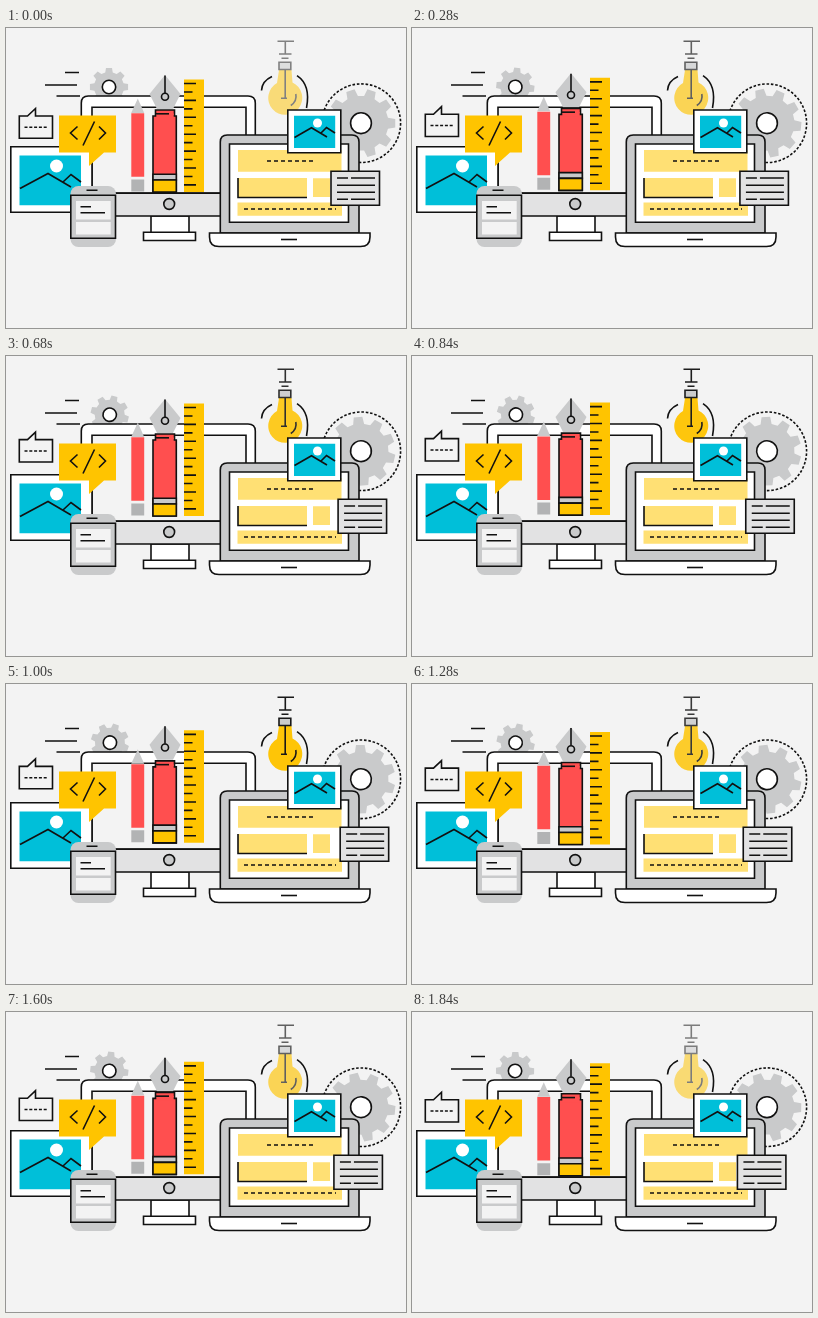
An HTML page that plays this animation: 400 by 300 pixels, repeating every 1880 ms.

```html
<!DOCTYPE html>
<html lang="en">
<head>
<meta charset="utf-8">
<title>Design workspace</title>
<style>
html, body { margin: 0; width: 100%; height: 100%; overflow: hidden; background: #f3f3f3; }
svg { display: block; width: 100%; height: 100%; }
.k { stroke: #111; stroke-width: 1.6; }
.n { fill: none; }
.w { fill: #fff; }
.b { fill: #f3f3f3; }
.g { fill: #c9cacb; }
.y { fill: #ffc400; }
.l { fill: #ffe074; }
.c { fill: #00bfd9; }
.r { fill: #ff4f4f; }
</style>
</head>
<body>
<svg viewBox="0 0 400 300">
  <path class="k n" d="M59 44.5h14M39 57h32M50.5 68h23.5"/>

  <g id="smallGear">
    <path class="g" id="smallTeeth"/>
    <circle class="k w" cx="103" cy="59" r="6.7"/>
  </g>
  <g id="bigGear">
    <circle class="k n" cx="355.3" cy="95.2" r="39.3" stroke-dasharray="2.6 1.8"/>
    <path class="g" id="bigTeeth"/>
    <circle class="k w" cx="355" cy="95.2" r="10.4"/>
  </g>

  <!-- monitor -->
  <path class="k w" d="M75.3 165V75q0-7 7-7H242q7.300 0 7.300 7V165z"/>
  <path class="k b" d="M86 165V79.200H240V165z"/>
  <path class="k w" d="M145 188h38v16.300h-38zM137.500 204.300h52v8.200h-52z"/>
  <path class="k" fill="#e2e2e3" d="M80 165.300H230V188H80z"/>
  <circle class="k g" cx="163.200" cy="176" r="5.400"/>

  <!-- left picture -->
  <path class="k w" d="M4.800 118.800H86V184.300H4.800z"/>
  <path class="c" d="M13.500 127.500H75V177.300H13.500z"/>
  <circle class="w" cx="50.500" cy="138" r="6.500"/>
  <path class="k n" d="M14 160.500L42 145.500L65 159M57 154L65 146.500L75 154"/>

  <path class="y" d="M53 87.500h57v37H98L83 138V124.500H53z"/>
  <path class="k n" d="M71.500 98.500L64.500 105L71.500 111.500M88.500 93.500L77 117.500M93 98.500L99.500 105L93 111.500"/>

  <!-- phone -->
  <rect class="g" x="64.500" y="158" width="45.500" height="61" rx="8"/>
  <path class="k g" d="M64.800 167.300h44.700v43H64.800z"/>
  <path class="b" d="M70 173h34.700v18.500H70zM70 194h34.700v12.500H70z"/>
  <path class="k n" d="M80.500 162.300h11M74.500 178.800h10.500M74.500 184.800h24.500"/>

  <!-- drawing tools -->
  <g id="tools">
    <path class="g" d="M131.800 70.500L138.200 85h-13z"/>
    <path class="r" d="M125.300 85.300h12.900v63.500h-12.900z"/>
    <path fill="#b2b3b4" d="M125.300 151.500h12.900v12h-12.900z"/>
    <path class="g" d="M159 47L174.500 66L167 81H151L143.500 66z"/>
    <path class="k n" d="M159 47.500V65"/>
    <circle class="k g" cx="159" cy="68.700" r="3.500"/>
    <path class="k r" d="M149.500 88V82h19v6z"/>
    <path class="k r" d="M147 88h23.300v76H147z"/>
    <path class="r" d="M150.300 85.500h17.400v5h-17.400z"/>
    <path class="k n" d="M150 85.800h13"/>
    <path class="k g" d="M147 146.300h23.300v5.700H147z"/>
    <path class="k y" d="M147 152h23.300v12H147z"/>
    <path class="y" d="M178 51.500h20v112.500h-20z"/>
    <path class="k n" id="ticks"/>
  </g>

  <!-- lamp -->
  <g id="lamp">
    <path class="k n" d="M271.500 13.200H288M279.300 13V26M273 26h12.500M275.500 30.300h7"/>
    <path class="y" d="M273 42h12.500l1 12.500A17 17 0 1 1 271 55z"/>
    <path class="k g" d="M273 34.200h11.800v7.300H273z"/>
    <path class="k n" d="M279.200 42V70M275 70.300h6M289.800 66q1.500 7-5 11.500"/>
  </g>
  <path class="k n" d="M266 48.500Q256 53 255.500 62.500M291 47.700Q305 57 300.500 80"/>

  <!-- laptop -->
  <path class="k g" d="M214.300 205V114q0-7 7-7H346q7 0 7 7V205z"/>
  <path class="k w" d="M223.500 116H342.500V194.300H223.500z"/>
  <path class="l" d="M232 122H335.500V143.800H232zM232 150h69v19.500h-69zM307 150.300h17v18.700h-17zM231.500 174.500H336V187.800H231.500z"/>
  <path class="k n" d="M232 150V169.500H301"/>
  <path class="k n" stroke-dasharray="4 3" d="M261 133h46M238 181h92"/>
  <path class="k w" d="M203.500 205H364v4q0 9.500-9.500 9.500H213q-9.500 0-9.500-9.500z"/>
  <path class="k n" d="M275 211.500h16"/>

  <!-- right picture -->
  <path class="k w" d="M281.800 82h53v42.700h-53z"/>
  <path class="c" d="M288 87.700h41.200v32.300H288z"/>
  <circle class="w" cx="311.500" cy="95" r="4.500"/>
  <path class="k n" d="M288.500 109.500L305.500 99.800L321 109M315 105L320.500 99.500L329 105"/>

  <g id="note">
    <path class="k" fill="#e2e2e3" d="M325 143.300h48.500v34H325z"/>
    <path class="k n" d="M331 150h11M345 150h24M331 157.200h38M331 164.300h38M331 171.300h11M345 171.300h24"/>
  </g>
  <g id="speech">
    <path class="k b" d="M13.300 88H21.500L29.500 80.500V88H46.500V110.300H13.300z"/>
    <path class="k n" stroke-dasharray="3 1.800" d="M18.500 99.300h22.500"/>
  </g>
</svg>
<script>
const LOOP = 1880, STEP = 40;
const $ = id => document.getElementById(id);
const move = (id, x, y) => $(id).setAttribute('transform', `translate(${x} ${y})`);

function gear(cx, cy, teeth, inner, outer, phase) {
  const pitch = 2 * Math.PI / teeth, points = [];
  for (let i = 0; i < teeth; i++)
    for (const [k, r] of [[-.32, inner], [-.2, outer], [.2, outer], [.32, inner]]) {
      const a = (i + k + phase) * pitch - Math.PI / 2;
      points.push((cx + r * Math.cos(a)).toFixed(2) + ' ' + (cy + r * Math.sin(a)).toFixed(2));
    }
  return 'M' + points.join('L') + 'z';
}
$('smallTeeth').setAttribute('d', gear(103, 59, 8, 15, 19.3, 0));
$('bigTeeth').setAttribute('d', gear(355, 95.2, 10, 27.5, 34.5, .5));

let ticks = '';
for (let i = 0; i < 13; i++) ticks += `M178 ${55.5 + i * 8.45}h${i % 2 ? 8.5 : 12}`;
$('ticks').setAttribute('d', ticks);

function draw(now) {
  const t = Math.floor(now % LOOP / STEP) * STEP;
  const p = 1 - Math.abs(2 * t / LOOP - 1);
  move('tools', 0, -5.5 * p);
  move('speech', 0, -6 * p);
  move('note', 9.8 * p, 0);
  $('lamp').setAttribute('opacity', .5 + .5 * p);
  $('smallGear').setAttribute('transform', `translate(${p} ${-.4 * p}) rotate(${20 * p} 103 59)`);
  $('bigGear').setAttribute('transform', `rotate(${18 * p} 355 95.2)`);
}
const start = performance.now();
function frame() {
  draw(performance.now() - start);
  requestAnimationFrame(frame);
}
frame();
</script>
</body>
</html>
```
